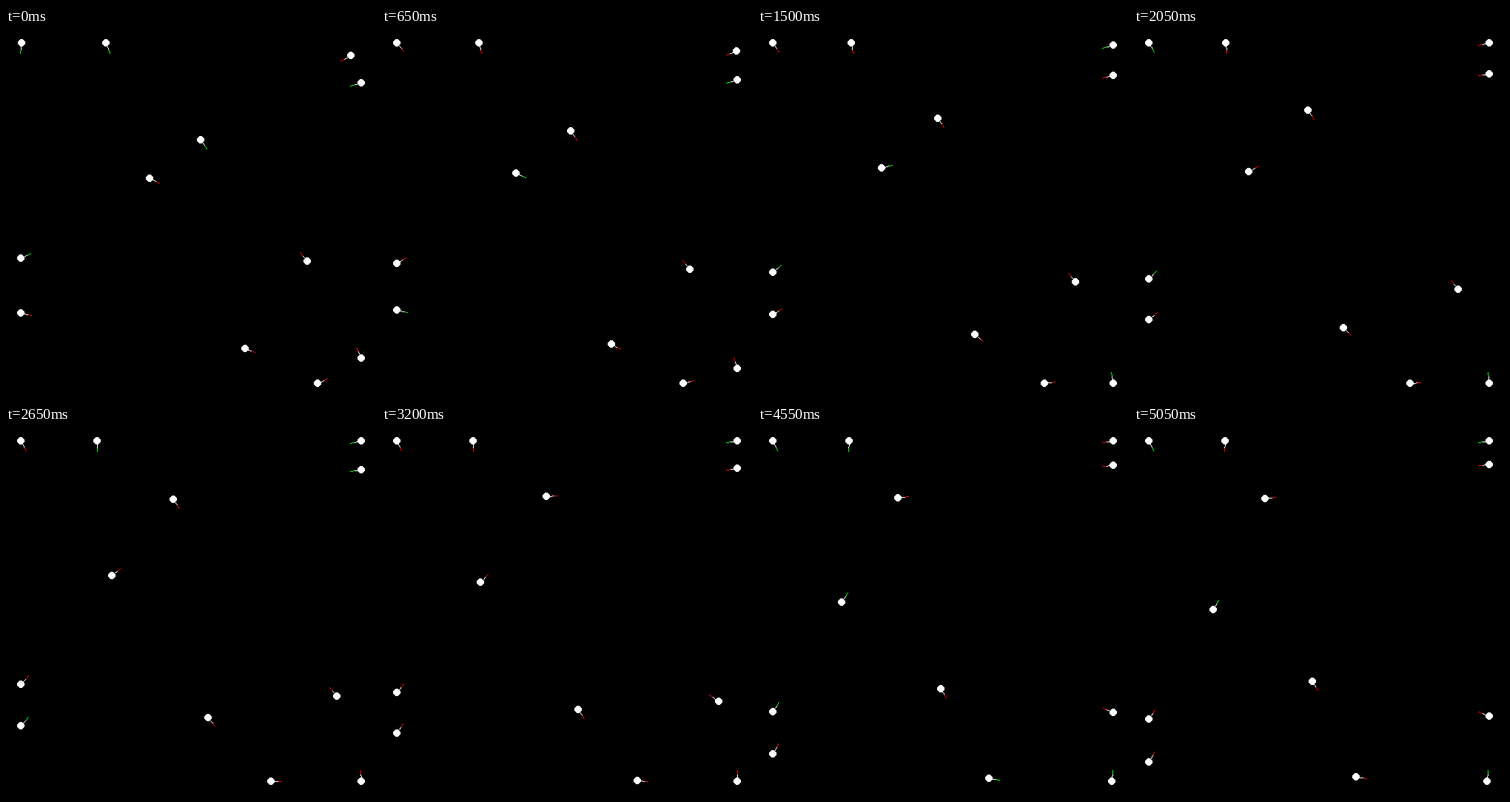
Recreate the animation shown at these times as an HTML page with a canvas. Size 500 by 500 pixels, loop 5.1 s.

```html
<!DOCTYPE html>
<html lang="en">
<head>
<meta charset="utf-8">
<title>Drifting bots</title>
<style>
  html, body { margin: 0; width: 100%; height: 100%; overflow: hidden; background: #000; }
  canvas { display: block; width: 500px; height: 500px; }
</style>
</head>
<body>
<canvas id="stage" width="500" height="500"></canvas>
<script>
const ctx = document.getElementById('stage').getContext('2d');
const LOOP = 5100, STEP = 50, LAST = 100;
const SPEED = 1.23, PIVOT_RATE = 10, WALL = 20, SIZE = 500;
const RADIUS = 5, TAIL = 15, TIP_START = 10;
const GREEN_CHANCE = 0.25, COLOR_HOLD = 4;

// A bot backs away from its tail. It keeps the angle `from` until `turnAt`,
// pivots on the spot to `mid`, then eases to the angle `to`.
const bot = (x, y, from, to, turnAt = 0, mid = from) => ({ x, y, from, to, turnAt, mid });

const bots = [
  bot(21, 20, 97, 66, 4, 49),
  bot(135, 20, 70, 92),
  bot(466, 37, 152, 172),
  bot(480, 74, 161, 174),
  bot(263, 151, 55, -6, 56, -2),
  bot(194, 203, 27, -58, 25, -18),
  bot(20, 311, -24, -55),
  bot(20, 385, 14, -62, 14, -20),
  bot(407, 315, -129, -160, 56, -140),
  bot(323, 433, 22, 60),
  bot(421, 480, -22, 8),
  bot(480, 446, -115, -85),
];

const clamp = (v, min, max) => Math.min(max, Math.max(min, v));
const radians = degrees => degrees * Math.PI / 180;
const easeOut = k => 1 - (1 - k) ** 2;
const random = (a, b) => {
  const v = Math.sin(a * 12.9898 + b * 78.233) * 43758.5453;
  return v - Math.floor(v);
};

function heading({ from, to, turnAt, mid }, step) {
  const turn = mid - from;
  const pivotEnd = turnAt + Math.abs(turn) / PIVOT_RATE;
  if (step < turnAt) return { angle: from, share: 1 };
  if (step < pivotEnd) {
    return { angle: from + Math.sign(turn) * PIVOT_RATE * (step - turnAt), share: 0 };
  }
  const k = (step - pivotEnd) / (LAST - pivotEnd);
  return { angle: mid + (to - mid) * easeOut(k), share: 1 };
}

function trace(b) {
  const path = [];
  let { x, y } = b;
  for (let step = 0; step <= LAST; step++) {
    const { angle, share } = heading(b, step);
    path.push({ x: Math.round(x), y: Math.round(y), angle: radians(angle) });
    x = clamp(x - SPEED * share * Math.cos(radians(angle)), WALL, SIZE - WALL);
    y = clamp(y - SPEED * share * Math.sin(radians(angle)), WALL, SIZE - WALL);
  }
  return path;
}

const paths = bots.map(trace);

function drawTail({ x, y, angle }, color) {
  const dx = Math.floor(TAIL * Math.cos(angle));
  const dy = Math.floor(TAIL * Math.sin(angle));
  const count = Math.max(Math.abs(dx), Math.abs(dy));
  for (let i = 0; i <= count; i++) {
    const k = i / count;
    ctx.fillStyle = k * TAIL < TIP_START ? '#fff' : color;
    ctx.fillRect(x + Math.round(dx * k), y + Math.round(dy * k), 1, 1);
  }
}

function drawDisc({ x, y }) {
  ctx.fillStyle = '#fff';
  for (let row = -RADIUS; row < RADIUS; row++) {
    const half = Math.round(Math.sqrt(RADIUS ** 2 - 1 - (row + 0.5) ** 2));
    ctx.fillRect(x - half, y + row, half * 2, 1);
  }
}

function draw(step) {
  ctx.fillStyle = '#000';
  ctx.fillRect(0, 0, SIZE, SIZE);
  paths.forEach((path, seed) => {
    const green = random(Math.floor(step / COLOR_HOLD), seed + 1) < GREEN_CHANCE;
    drawTail(path[step], green ? '#0f0' : '#f00');
    drawDisc(path[step]);
  });
}

const start = performance.now();
function tick() {
  const time = (performance.now() - start) % LOOP;
  draw(clamp(Math.floor(time / STEP) - 1, 0, LAST));
  requestAnimationFrame(tick);
}
tick();
</script>
</body>
</html>
```
